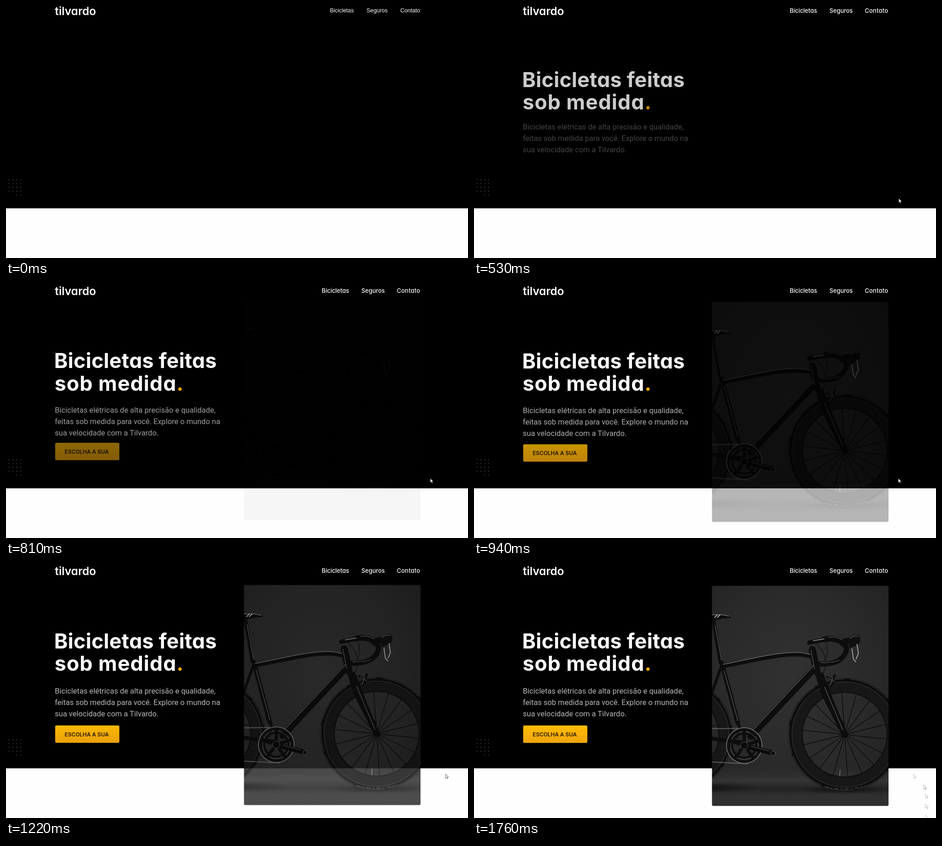
Animation, 1012 px wide and 553 px high, one loop 2240 ms. Source, as an HTML page:

```html
<!DOCTYPE html>
<html lang="pt-BR">
<head>
<meta charset="utf-8">
<title>Bicicletas feitas sob medida</title>
<style>
html, body { margin: 0; width: 100%; height: 100%; overflow: hidden; background: #fefefe; }
svg { display: block; width: 100vw; height: 100vh; }
text { font-family: Inter, sans-serif; font-optical-sizing: none; font-feature-settings: "cv11"; fill: #fff; }
.logo { font-size: 24.5px; font-weight: 600; }
.nav text { font-size: 12.9px; font-weight: 450; }
.nav.plain text { font: 12.4px "Liberation Sans", Arial, sans-serif; }
.title text { font-size: 45px; font-weight: 650; }
.copy text { font: 16.57px Roboto, sans-serif; fill: #b8b8b8; }
.button text { font-size: 11.9px; font-weight: 600; fill: #2a1a00; }
.line { fill: none; stroke-linecap: round; stroke-linejoin: round; }

/* The script below drives every paused animation in steps. */
.show { animation: show 800ms ease var(--at) both paused; }
.pop { animation: pop 1ms linear var(--at) both paused; }
.drop { animation: drop 1ms linear 40ms both paused; }
.cursor { animation: wander 2240ms linear both paused; }

@keyframes show { from { opacity: 0; transform: translateY(-13.5px); } to { opacity: 1; transform: none; } }
@keyframes pop { from { opacity: 0; } }
@keyframes drop { to { opacity: 0; } }
@keyframes wander {
  0% { transform: translate(993px, 600px); }
  2.23% { transform: translate(993px, 533px); }
  5.3% { transform: translate(975px, 482px); }
  8.3% { transform: translate(958px, 448px); }
  11.4% { transform: translate(945px, 429px); }
  14.5% { transform: translate(938px, 424px); }
  17.5% { transform: translate(933px, 422px); }
  23.6% { transform: translate(930px, 422px); }
  36%, 48.1% { transform: translate(929px, 422px); }
  51.1% { transform: translate(934px, 427px); }
  54.15% { transform: translate(962.5px, 456px); }
  57.2% { transform: translate(985px, 480px); }
  60.25% { transform: translate(988.5px, 499px); }
  63.3% { transform: translate(988.5px, 522px); }
  66.4% { transform: translate(988.5px, 546px); }
  69.4%, 100% { transform: translate(988.5px, 560px); }
}
</style>
</head>
<body>
<svg viewBox="0 0 1012 553" preserveAspectRatio="none">
  <defs>
    <linearGradient id="gold" x2="0" y2="1">
      <stop stop-color="#ffbd04"/><stop offset="1" stop-color="#efa50e"/>
    </linearGradient>
    <radialGradient id="wall" cx=".45" cy=".42" r=".75">
      <stop stop-color="#313132"/><stop offset=".55" stop-color="#2a2a2b"/><stop offset="1" stop-color="#222223"/>
    </radialGradient>
    <linearGradient id="floor" x2="0" y2="1">
      <stop stop-color="#2d2d2e" stop-opacity="0"/><stop offset=".35" stop-color="#343435"/>
      <stop offset=".56" stop-color="#242425"/><stop offset=".74" stop-color="#303031"/><stop offset="1" stop-color="#2e2e2f"/>
    </linearGradient>
    <radialGradient id="shade">
      <stop stop-color="#111"/><stop offset="1" stop-color="#111" stop-opacity="0"/>
    </radialGradient>
    <clipPath id="frame"><rect x="521.3" y="43.5" width="386.7" height="483" rx="3"/></clipPath>
    <path id="arrow" d="M.4 .4V9.6L2.6 7.6 4 10.9 5.5 10.3 4.1 7H7Z"/>
    <g id="wheel" class="line">
      <circle r="104" stroke="#171718" stroke-width="24"/>
      <circle r="93" stroke="#0d0d0d" stroke-width="2"/>
      <circle r="120" stroke="#0d0d0e" stroke-width="8"/>
      <circle r="115.5" stroke="#3c3c3d" stroke-width="1"/>
      <circle r="122.5" stroke="#484849" stroke-width="1" stroke-dasharray="60 14 90 8"/>
      <path id="spokes" stroke="#0a0a0a" stroke-width="1.3"/>
      <circle r="7" fill="#0a0a0a"/>
    </g>
  </defs>

  <rect width="1012" height="553" fill="#fefefe"/>
  <rect width="1012" height="444"/>
  <path class="line" d="M7 381.5h26M7 389.8h26M7 398.1h26M7 406.4h26M23.6 414.7h9"
        stroke="#323232" stroke-width="2.6" stroke-dasharray="0 8.3"/>

  <text class="logo" x="107" y="20">tilvardo</text>
  <g class="nav plain drop">
    <text x="709.5" y="14.3">Bicicletas</text><text x="789.8" y="14.3">Seguros</text><text x="863.7" y="14.3">Contato</text>
  </g>
  <g class="nav pop" style="--at:40ms">
    <text x="691.5" y="15.3">Bicicletas</text><text x="778.5" y="15.3">Seguros</text><text x="856" y="15.3" letter-spacing=".3">Contato</text>
  </g>

  <g class="title show" style="--at:130ms">
    <text x="105.5" y="180.5" letter-spacing=".25">Bicicletas feitas</text>
    <text x="106.5" y="230" letter-spacing="1">sob medida<tspan fill="#f0b000">.</tspan></text>
  </g>
  <g class="copy show" style="--at:342ms">
    <text x="107" y="279.8">Bicicletas elétricas de alta precisão e qualidade,</text>
    <text x="107" y="304.7">feitas sob medida para você. Explore o mundo na</text>
    <text x="107" y="329.6">sua velocidade com a Tilvardo.</text>
  </g>
  <g class="button show" style="--at:545ms">
    <rect x="107.7" y="350" width="140.6" height="38.3" rx="3" fill="url(#gold)"/>
    <text x="128.5" y="373.8">ESCOLHA A SUA</text>
  </g>

  <g class="show" style="--at:760ms">
    <g clip-path="url(#frame)">
      <rect x="521" y="43" width="387" height="484" fill="url(#wall)"/>
      <rect x="521" y="440" width="387" height="87" fill="url(#floor)"/>
      <ellipse cx="810" cy="491" rx="105" ry="9" fill="url(#shade)"/>
      <ellipse cx="500" cy="486" rx="130" ry="12" fill="url(#shade)"/>

      <use href="#wheel" x="443" y="371"/>
      <use href="#wheel" x="812" y="370"/>
      <g class="line">
        <path d="M802 447l-1 14" stroke="#888" stroke-width="1.2"/>
        <path d="M768 484Q812 496 856 482" stroke="#6a6a6b" stroke-dasharray="9 5 3 5"/>
      </g>

      <g class="line" stroke="#0d0d0e">
        <path d="M521 357L592 356M521 430L600 434" stroke="#666667" stroke-width="2" stroke-dasharray="2 2"/>
        <path d="M541 222L515 296" stroke-width="6"/>
        <path d="M515 378L592 388" stroke-width="9"/>
        <path d="M525 122L540 212" stroke-width="8"/>
        <path d="M543 214L578 345" stroke-width="10"/>
        <path d="M572 335l10 18-6 22" stroke-width="6"/>
        <path d="M545 219C597 210 645 197 690 194Q720 192 742 199" stroke-width="10"/>
        <path d="M748 222L606 374" stroke-width="15"/>
        <path d="M741 184L751 232" stroke-width="16"/>
        <path d="M734 168L772 161" stroke-width="9"/>
        <path d="M768 161Q790 156 806 167L832 162" stroke-width="13"/>
        <path d="M806 170Q822 176 812 194Q798 217 758 215" stroke-width="11"/>
        <path d="M738 176Q728 200 746 208M748 168Q785 205 762 240M772 170Q778 196 768 206" stroke-width="1.2"/>
        <path d="M774 244l16 10-8 8 8-22" stroke-width="5"/>
        <path d="M810 343v28" stroke-width="4"/>
      </g>
      <path fill="#0d0d0e" d="M748 238L764 233Q778 270 788 296L818 368 808 375 770 300Q754 266 748 238Z"/>
      <path fill="#0d0d0e" d="M521 106H545Q561 108 563 114L545 115 521 121Z"/>
      <path fill="#101011" d="M820 160Q830 148 842 151 852 162 840 174L822 180Z"/>

      <g class="line" stroke="#5c5c5d" stroke-width="1.3">
        <path d="M546 215.5C597 206 645 193 690 190Q716 188 736 194" stroke="#747475" stroke-width="1.6"/>
        <path d="M744 218L610 361M548 230L578 340M738 184L746 226M768 266L808 360M528 130L542 206"/>
        <path d="M776 157Q790 152 806 162M800 207Q784 213 760 212M824 159Q833 150 842 155"/>
        <path d="M521 107H545L558 110" stroke="#777"/>
        <path d="M743 164l24-4" stroke="#999"/>
        <path d="M527 113l6-6M533 113l6-6" stroke="#ccc" stroke-width="1.6"/>
        <path d="M839 172l3 20-5 12M828 182l3 22 5 6" stroke="#9a9a9b" stroke-width="2"/>
        <path d="M776 246l14 8M780 262l6-16"/>
      </g>

      <g class="line" transform="translate(592 394)">
        <circle r="36" stroke="#101011" stroke-width="7"/>
        <circle r="39" stroke="#777778" stroke-width="1.8" stroke-dasharray="1.8 1.8"/>
        <circle r="27" stroke="#0d0d0e" stroke-width="5"/>
        <circle r="30" stroke="#5a5a5b"/>
        <path d="M0 0V-32M0 0L30-10M0 0L19 26M0 0L-19 26M0 0L-30-10" stroke="#0d0d0e" stroke-width="7"/>
        <path d="M0 0L60 16" stroke="#0a0a0b" stroke-width="11"/>
        <path d="M14 1L54 12" stroke="#5a5a5b" stroke-width="1.2"/>
        <circle r="8" fill="#0a0a0b" stroke="#5a5a5b"/>
        <circle cx="63" cy="17" r="5" fill="#0d0d0e" stroke="#666"/>
      </g>
    </g>
  </g>

  <g fill="none" stroke="#000" stroke-width=".8">
    <g class="pop" style="--at:1270ms"><use href="#arrow" x="962" y="456" opacity=".25"/></g>
    <g class="pop" style="--at:1340ms"><use href="#arrow" x="984.7" y="480" opacity=".45"/></g>
    <g class="pop" style="--at:1410ms"><use href="#arrow" x="988.3" y="499" opacity=".3"/></g>
    <g class="pop" style="--at:1480ms"><use href="#arrow" x="988.3" y="522" opacity=".3"/></g>
    <g class="pop" style="--at:1545ms"><use href="#arrow" x="988.3" y="546" opacity=".25"/></g>
  </g>
  <use class="cursor" href="#arrow" fill="#fff" stroke="#222" stroke-width=".7"/>
</svg>
<script>
const LOOP = 2240, STEP = 68.4, LAST = 25;

const spokes = Array.from({ length: 18 }, (_, i) => {
  const a = (i + 0.3) * Math.PI / 9;
  return `M0 0L${(92 * Math.cos(a)).toFixed(1)} ${(92 * Math.sin(a)).toFixed(1)}`;
});
document.getElementById("spokes").setAttribute("d", spokes.join(""));

const clips = document.getAnimations();

// The picture changes in even steps, then rests until the loop restarts.
function clock(t) {
  const k = Math.min(LAST, Math.floor((t - 44) / STEP));
  return k < 0 ? 0 : 50 + k * STEP;
}

function tick(now) {
  const t = clock(now % LOOP);
  for (const clip of clips) clip.currentTime = t;
  requestAnimationFrame(tick);
}
tick(0);
</script>
</body>
</html>
```
